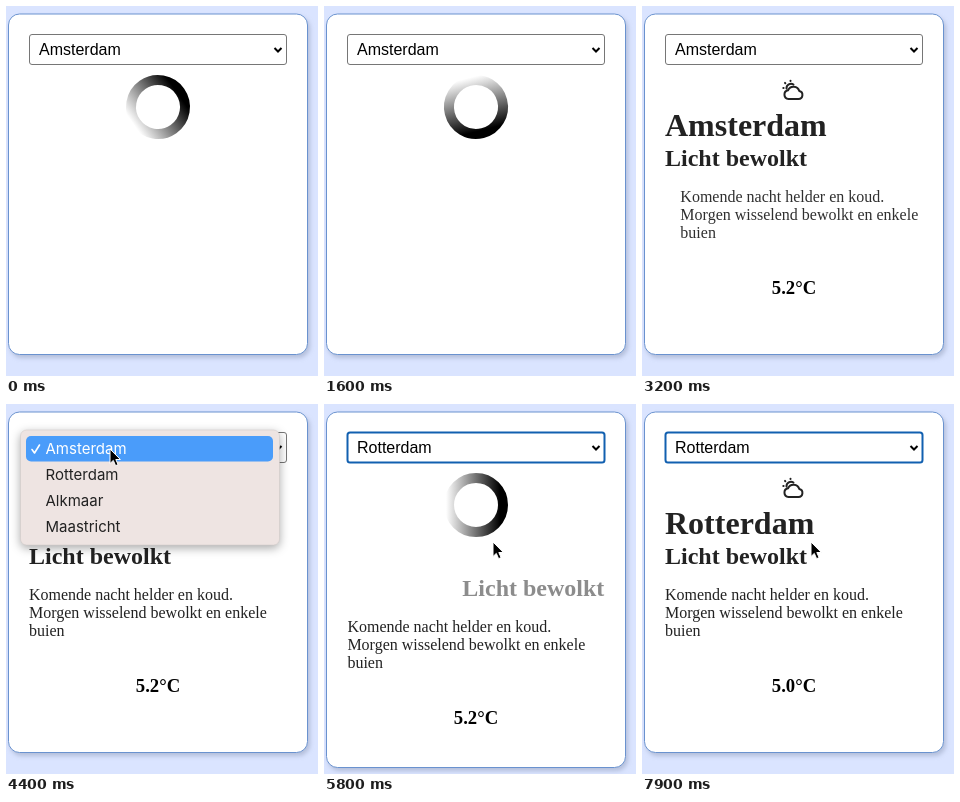
Animation of 312 by 370 pixels, one loop 8000 ms. Source, as an HTML page:

```html
<!DOCTYPE html>
<html lang="nl">
<head>
<meta charset="utf-8">
<title>Weer</title>
<style>
  html, body { margin: 0; height: 100%; overflow: hidden; background: #dae4ff; }
  svg { display: block; width: 100vw; height: 100vh; }
  .card { fill: #fff; stroke: #6a92cf; filter: drop-shadow(2px 3px 2px #8e9ab580); }
  .serif { font: 16px "Liberation Serif", serif; fill: #222; }
  .sans { font: 16px "Liberation Sans", sans-serif; }
  .menu { font: 15px Inter, sans-serif; fill: #222; }
  .menu .panel { fill: #eee4e2; stroke: #cfc6c5; stroke-width: .5; filter: drop-shadow(0 3px 5px #0005); }
  .line { fill: none; stroke: #222; stroke-width: 2; stroke-linecap: round; stroke-linejoin: round; }
  #title { font-size: 32px; font-weight: bold; }
  #sky { font-size: 24px; font-weight: bold; }
  #temp { font-size: 18.72px; font-weight: bold; fill: #000; text-anchor: middle; }
</style>
</head>
<body>
<svg viewBox="0 0 312 370">
  <defs>
    <linearGradient id="fade" gradientUnits="userSpaceOnUse" x1="0" y1="-24" x2="0" y2="30">
      <stop stop-color="#000"/><stop offset="1" stop-color="#fff"/>
    </linearGradient>
    <clipPath id="inside"><rect x="23" y="60" width="258" height="300"/></clipPath>
  </defs>
  <rect id="card" class="card" x="2.5" y="8" width="299" height="340.5" rx="11"/>

  <rect id="box" x="23.5" y="28.5" width="257" height="30" rx="2.5" fill="#fff"/>
  <text id="city" class="sans" x="33" y="49"></text>
  <path class="line" d="M268.5 42l3.5 3.5 3.5-3.5" style="stroke:#000;stroke-linecap:butt;stroke-linejoin:miter"/>

  <circle id="spinner" r="27" fill="none" stroke="url(#fade)" stroke-width="10"/>

  <g clip-path="url(#inside)">
    <g id="body" class="serif">
      <path id="icon" class="line" d="M146.5 93h10a4 4 0 0 0 .8-7.9a6 6 0 0 0-11.3-.8a4.4 4.4 0 0 0 .5 8.7zM144.5 82.5a4.5 4.5 0 0 1 7-4M148.5 75v-.3M143.3 77.2l-.3-.3M141.6 82h-.3"/>
      <text id="title" x="23" y="130"></text>
      <text id="sky" x="23" y="160">Licht bewolkt</text>
      <text id="info"><tspan x="23" y="196">Komende nacht helder en koud.</tspan><tspan x="23" y="214">Morgen wisselend bewolkt en enkele</tspan><tspan x="23" y="232">buien</tspan></text>
      <text id="temp" x="152" y="288"></text>
    </g>
  </g>

  <g id="menu" class="menu">
    <rect class="panel" x="14.5" y="26" width="259" height="115" rx="6"/>
    <rect id="bar" x="20" width="247" height="25.5" rx="5" fill="#4a9cfa"/>
    <path id="tick" class="line" d="M26 45.5l2.5 3.5 5-8" style="stroke-width:1.6"/>
    <g id="items"></g>
  </g>

  <path id="cursor" d="M0 0v14.5l3.3-3.1 2.3 5.3 2.5-1.1-2.3-5.1h4.6z" fill="#000" stroke="#fff"/>
</svg>
<script>
const LOOP = 8000, STEP = 100, SLIDE = 300, GAP = 200, SHIFT = 240;
const READY = 2620, OPEN = 4400, PICK = 5100, LEAVE = 5365, RELOADED = 7200;
const cities = ["Amsterdam", "Rotterdam", "Alkmaar", "Maastricht"];
const $ = id => document.getElementById(id);
const set = (id, attrs) => { for (const k in attrs) $(id).setAttribute(k, attrs[k]); };
const show = (id, on) => $(id).style.display = on ? "" : "none";
const clamp = x => Math.min(1, Math.max(0, x));

$("items").innerHTML = cities.map((c, i) => `<text x="39.5" y="${50 + 26 * i}">${c}</text>`).join("");

// Points are [time, ...values], joined by straight lines
function track(points, t) {
  let i = 1;
  while (i < points.length - 1 && t > points[i][0]) i++;
  const a = points[i - 1], b = points[i], u = clamp((t - a[0]) / (b[0] - a[0]));
  return a.slice(1).map((v, k) => v + (b[k + 1] - v) * u);
}

const spin = [[0, 55], [1000, 565], [2300, 1260], [5800, 2970], [6900, 3510], [8000, 4060]];
const pointer = [[3200, 110, -20], [3300, 110, 4], [3800, 110, 4], [4200, 104, 45],
  [4600, 104, 45], [4900, 110, 74], [5100, 110, 74], [5500, 169, 138]];

// How far a line is from rest: 0 in place, 1 gone
function away(t, n) {
  const d = n * GAP;
  const enter = start => (1 - clamp((t - start - d) / SLIDE)) ** 3;
  if (t >= RELOADED) return enter(RELOADED);
  if (t >= LEAVE) return clamp((t - LEAVE - d) / SLIDE) ** 3;
  return enter(READY);
}

function draw(t) {
  const loaded = t >= READY, picked = t >= PICK, renewed = t >= RELOADED;
  const reloading = t >= LEAVE - 65 && !renewed;
  const busy = !loaded || reloading;

  set("card", { height: reloading ? 355.5 : 340.5 });
  set("box", { stroke: picked ? "#1260b0" : "#767676", "stroke-width": picked ? 2 : 1 });
  $("city").textContent = cities[+picked];

  show("spinner", busy);
  set("spinner", { transform: `translate(152 101) rotate(${track(spin, t)[0]})` });

  show("body", loaded);
  show("icon", !busy);
  set("body", { transform: `translate(0 ${reloading ? 32 : 0})` });
  $("title").textContent = cities[+renewed];
  $("temp").textContent = renewed ? "5.0°C" : "5.2°C";
  ["title", "sky", "info"].forEach((id, n) => {
    const e = away(t, n);
    set(id, { transform: `translate(${SHIFT * e} 0)`, opacity: 1 - e });
  });

  const [x, y] = track(pointer, t), row = y > 58 ? 1 : 0;
  show("menu", t >= OPEN && !picked);
  set("bar", { y: 32 + 26 * row });
  $("tick").style.stroke = row ? "#222" : "#fff";
  [...$("items").children].forEach((item, i) => item.style.fill = i === row ? "#fff" : "");
  set("cursor", { transform: `translate(${x} ${y})` });
}

const begin = performance.now();
function frame() {
  const t = (performance.now() - begin) % LOOP;
  draw(Math.floor(t / STEP) * STEP);
  requestAnimationFrame(frame);
}
frame();
</script>
</body>
</html>
```
